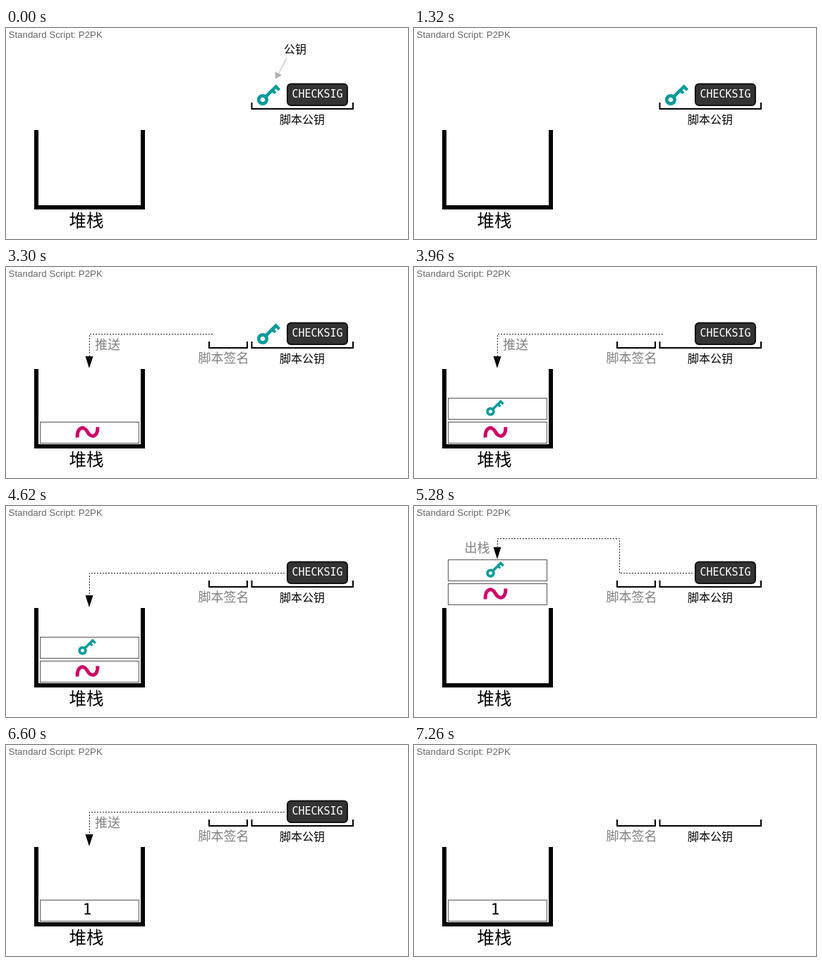
An HTML page with a canvas that plays this animation: 570 px wide and 300 px high, repeating every 8580 ms.

```html
<!DOCTYPE html>
<html lang="zh-CN">
<head>
<meta charset="utf-8">
<title>Standard Script: P2PK</title>
<style>
html, body { margin: 0; width: 100%; height: 100%; overflow: hidden; background: #fff; }
canvas { display: block; }
</style>
</head>
<body>
<canvas id="stage" width="570" height="300"></canvas>
<script>
const ctx = document.getElementById('stage').getContext('2d');
const LOOP = 8580, BEAT = 660, LAST = 10;
const CJK = '"Noto Sans CJK SC", "Noto Sans CJK", sans-serif';
const MONO = '"DejaVu Sans Mono", monospace';
const SANS = '"Liberation Sans", Arial, sans-serif';
const TEAL = '#009999', PINK = '#cc0066', GREY = '#808080';

function text(str, x, y, size, color = '#000', family = CJK, align = 'left') {
  ctx.font = `${size}px ${family}`;
  ctx.textAlign = align;
  ctx.fillStyle = color;
  ctx.fillText(str, x, y);
}

function line(points, width, color = '#000', dash = []) {
  ctx.beginPath();
  points.forEach(([x, y]) => ctx.lineTo(x, y));
  ctx.lineWidth = width;
  ctx.strokeStyle = color;
  ctx.setLineDash(dash);
  ctx.stroke();
  ctx.setLineDash([]);
}

function fill(points, color) {
  ctx.beginPath();
  points.forEach(([x, y]) => ctx.lineTo(x, y));
  ctx.fillStyle = color;
  ctx.fill();
}

function bracket(x1, x2) {
  line([[x1, 106], [x1, 115], [x2, 115], [x2, 106]], 2);
}

// Placed by the centre of its ring
function key(x, y, scale) {
  ctx.save();
  ctx.translate(x, y);
  ctx.scale(scale, scale);
  ctx.rotate(-Math.PI / 4);
  ctx.beginPath();
  ctx.arc(0, 0, 5.7, 0, Math.PI * 2);
  ctx.lineWidth = 4.7;
  ctx.strokeStyle = TEAL;
  ctx.stroke();
  ctx.fillStyle = TEAL;
  ctx.fillRect(6, -2.3, 22.5, 4.6);
  ctx.fillRect(24.2, 0, 4.3, 7);
  ctx.fillRect(17, 0, 4.2, 6.2);
  ctx.restore();
}

function signature(x, y, scale) {
  ctx.save();
  ctx.translate(x, y);
  ctx.scale(scale, scale);
  ctx.beginPath();
  ctx.moveTo(-14.5, 7.5);
  ctx.bezierCurveTo(-14.5, -9, -4.5, -9, 0, -0.5);
  ctx.bezierCurveTo(4.5, 8, 14.5, 8, 14.5, -7.5);
  ctx.lineWidth = 5;
  ctx.strokeStyle = PINK;
  ctx.stroke();
  ctx.restore();
}

function note(str, x) {
  text(str, x, 36, 16);
  line([[x + 4, 43], [x - 8, 66]], 1, '#b0b0b0');
  fill([[x - 12, 72.5], [x - 12.5, 62], [x - 3, 67]], '#b0b0b0');
}

function checksig() {
  ctx.beginPath();
  ctx.roundRect(399, 79.5, 85, 30.5, 5);
  ctx.fillStyle = '#333';
  ctx.fill();
  ctx.lineWidth = 2;
  ctx.strokeStyle = '#111';
  ctx.stroke();
  text('CHECKSIG', 441.5, 98.5, 15, '#fff', MONO, 'center');
}

function slot(y) {
  ctx.lineWidth = 1;
  ctx.strokeStyle = '#555';
  ctx.strokeRect(48.5, y + 0.5, 140, 30);
}

function stackItems(lift) {
  slot(220 - lift);
  signature(115.5, 235 - lift, 1);
}

function stackKey(lift) {
  slot(186 - lift);
  key(108.5, 205.5 - lift, 0.77);
}

function route(points, tipY) {
  line(points, 1, '#222', [2, 2]);
  fill([[112.5, tipY - 17], [123.5, tipY - 17], [118, tipY]], '#000');
}

function push(fromX, labelled) {
  route([[fromX, 95.5], [118.5, 95.5], [118.5, 127]], 144);
  if (labelled) text('推送', 126, 117, 18, GREY);
}

function pop() {
  route([[395, 95.5], [291.5, 95.5], [291.5, 46.5], [118.5, 46.5], [118.5, 58]], 75.5);
  text('出栈', 71.5, 66, 18, GREY);
}

function draw(step) {
  ctx.fillStyle = '#fff';
  ctx.fillRect(0, 0, 570, 300);
  text('Standard Script: P2PK', 3.5, 14, 13.33, '#666', SANS);

  line([[43, 145], [43, 255], [194, 255], [194, 145]], 6);
  text('堆栈', 114, 283, 24.5, '#000', CJK, 'center');

  bracket(348.5, 492);
  text('脚本公钥', 388, 136, 16);
  if (step >= 2) {
    bracket(288, 342);
    text('脚本签名', 272.5, 136, 18, GREY);
  }

  if (step <= 4) key(364, 102, 1);
  if (step <= 9) checksig();
  if (step === 2 || step === 3) signature(315, 95, 1.29);
  if (step === 0) note('公钥', 394);
  if (step === 2) note('签名', 337);

  const lift = step >= 7 ? 110 : 0;
  if (step >= 4 && step <= 8) stackItems(lift);
  if (step >= 5 && step <= 8) stackKey(lift);
  if (step >= 9) {
    slot(220);
    text('1', 115, 241, 21, '#000', MONO, 'center');
  }

  if (step === 4) push(293, true);
  if (step === 5) push(353, true);
  if (step === 6) push(395, false);
  if (step === 7) pop();
  if (step === 9) push(395, true);
}

const start = performance.now();

function tick() {
  const t = (performance.now() - start) % LOOP;
  // The first and last steps last two beats
  draw(Math.min(LAST, Math.max(0, Math.floor(t / BEAT) - 1)));
  requestAnimationFrame(tick);
}
tick();
</script>
</body>
</html>
```
